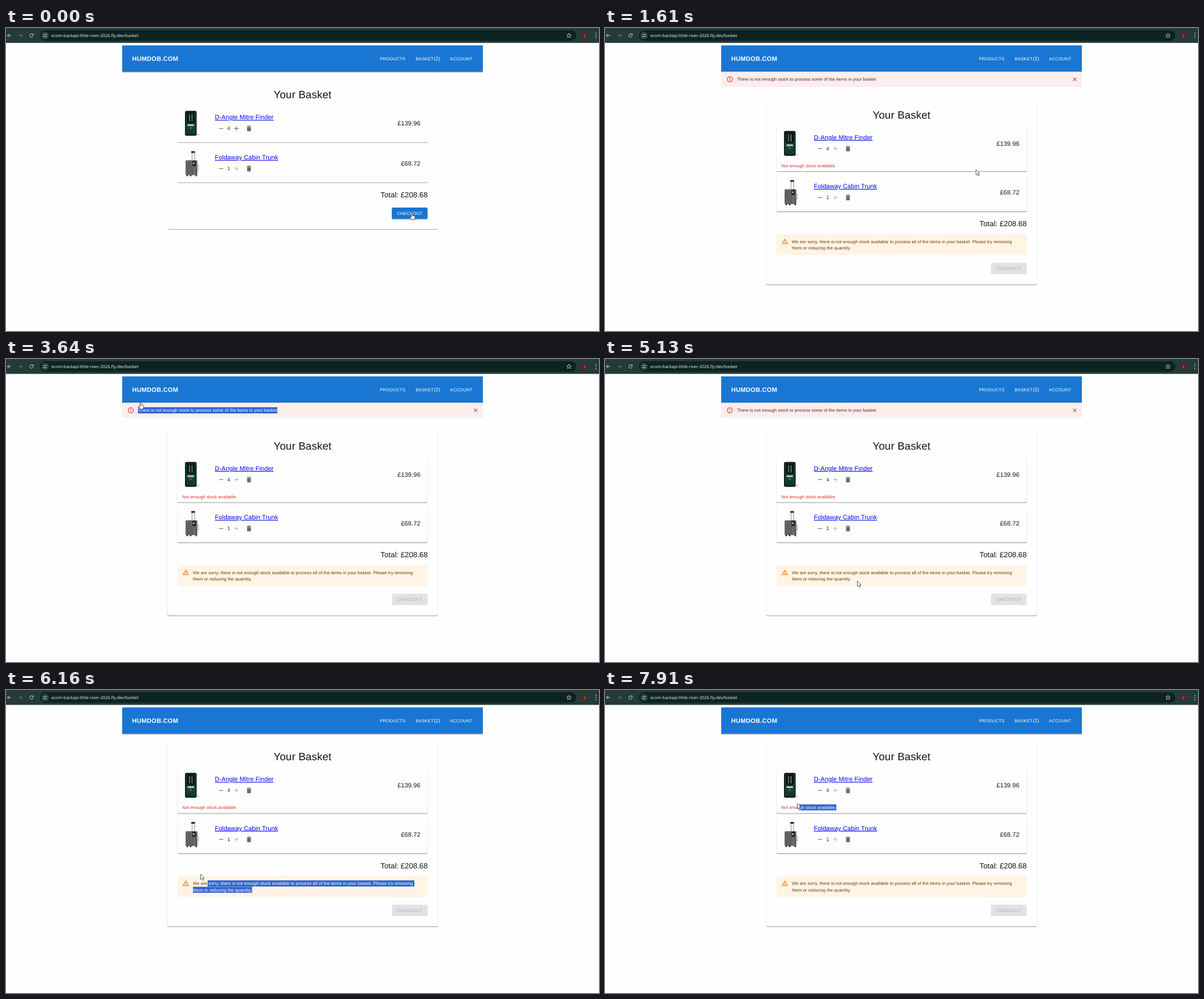
These frames come from a looping animation (1047x535 px, 8 s). An HTML page:

```html
<!DOCTYPE html>
<html lang="en">
<head>
<meta charset="utf-8">
<title>Your Basket</title>
<style>
html, body { margin: 0; width: 100%; height: 100%; overflow: hidden; background: #fefefe; }
svg { display: block; }
text { font-family: "Liberation Sans", Arial, sans-serif; white-space: pre; text-rendering: geometricPrecision; }
.bar text { font-family: "Open Sans", "Noto Sans", sans-serif; }
</style>
</head>
<body>
<svg id="stage" width="1047" height="535" viewBox="0 0 1047 535"></svg>
<script>
const LOOP = 8000, ZOOM = 0.5527, BLUE = '#1976d2', INK = '#151515', PAPER = '#fefefe';
const ALERT_IN = 420, BUTTON_GREY = 560, ALERT_OUT = 5260;

const ICON = {
  minus: 'M19 13H5v-2h14z',
  plus: 'M19 13h-6v6h-2v-6H5v-2h6V5h2v6h6z',
  bin: 'M6 19c0 1.1.9 2 2 2h8c1.1 0 2-.9 2-2V7H6zM19 4h-3.5l-1-1h-5l-1 1H5v2h14z',
  error: 'M11 15h2v2h-2zm0-8h2v6h-2zm.99-5C6.47 2 2 6.48 2 12s4.47 10 9.99 10C17.52 22 22 17.52 22 12S17.52 2 11.99 2M12 20c-4.42 0-8-3.58-8-8s3.58-8 8-8 8 3.58 8 8-3.58 8-8 8',
  warn: 'M12 5.99 19.53 19H4.47zM12 2 1 21h22zm1 14h-2v2h2zm0-6h-2v4h2z',
  close: 'M19 6.41 17.59 5 12 10.59 6.41 5 5 6.41 10.59 12 5 17.59 6.41 19 12 13.41 17.59 19 19 17.59 13.41 12z',
};

const CURSOR = {
  arrow: '<path d="M0 0V9.6L2.2 7.6 3.8 11 5.4 10.3 3.9 7H6.8Z" fill="#fff" stroke="#222" stroke-width=".7"/>',
  hand: '<path d="M-1 1Q-1 0 0 0T1 1V4.6Q5.8 4.8 5.8 7T4.4 12H-.5Q-2.4 9.5-3.7 7.8-3 6.2-1 7.8Z" fill="#fff" stroke="#222" stroke-width=".8"/>',
  beam: '<path d="M-1.5 0H1.5M0 0V10M-1.5 10H1.5" fill="none" stroke="#333" stroke-width=".8"/>',
};

// Pointer poses, each held until the next: time, x, y, shape, selected text, its left edge
const POSES = [
  [0, 716.5, 326.5, 'hand'], [420, 716, 326],
  [1480, 702, 306], [1610, 655, 250], [1740, 590, 180], [1870, 525, 118], [2000, 488, 90], [2130, 471, 78],
  [2260, 485, 87.5, 'beam'], [2970, 481, 87],
  [3110, 374, 80, 'arrow', 'alert', 374], [3250, 318, 66, 'arrow', 'alert', 318],
  [3380, 266, 52, 'hand', 'alert', 266], [3510, 240, 64, 'hand', 'alert', 233],
  [3640, 237.5, 76.5, 'hand', 'alert', 233],
  [3920, 238, 84], [4050, 240, 120], [4180, 247, 172], [4320, 274, 261], [4460, 304, 345],
  [4590, 335, 408], [4740, 388, 405], [4870, 421, 393], [5010, 441, 391], [5130, 445.5, 392],
  [5520, 440, 365], [5650, 436, 349, 'beam'],
  [5780, 412, 346, 'arrow', 'lower', 412], [5910, 385, 338, 'arrow', 'upper', 385],
  [6040, 362, 331, 'arrow', 'upper', 366], [6160, 343.5, 325, 'arrow', 'upper', 356],
  [6310, 343.5, 325, 'arrow', 'upper', 343],
  [6600, 365, 335], [6730, 405, 355], [6850, 435, 371, 'beam'], [7120, 432, 370],
  [7260, 428, 320], [7390, 418, 240], [7520, 410, 202, 'beam'],
  [7650, 404, 201, 'arrow', 'stock', 404], [7780, 372, 200, 'arrow', 'stock', 372],
  [7910, 339.5, 200, 'arrow', 'stock', 343],
];

const text = (x, y, words, px, fill = INK, spacing = .0107, more = '') =>
  `<text x="${x}" y="${y}" font-size="${px * ZOOM}" fill="${fill}" letter-spacing="${spacing}em" ${more}>${words}</text>`;
const rect = (x, y, w, h, fill, r = 0) =>
  `<rect x="${x}" y="${y}" width="${w}" height="${h}" fill="${fill}" rx="${r}"/>`;
const circle = (x, y, r, fill) => `<circle cx="${x}" cy="${y}" r="${r}" fill="${fill}"/>`;
const line = (d, stroke, width = 1) => `<path d="${d}" fill="none" stroke="${stroke}" stroke-width="${width}"/>`;
const move = (x, y, body) => `<g transform="translate(${x} ${y})">${body}</g>`;
const crop = (x, y, w, h, body) =>
  `<svg x="${x}" y="${y}" width="${w}" height="${h}" viewBox="${x} ${y} ${w} ${h}">${body}</svg>`;
// Icon on a 24 unit grid, centred on x, y
const icon = (name, x, y, px, fill) =>
  `<path d="${ICON[name]}" fill="${fill}" transform="translate(${x} ${y}) scale(${px * ZOOM / 24}) translate(-12 -12)"/>`;

// Soft bottom shadow, then the box itself
const raised = (x, y, w, h, fill, r = 0) =>
  rect(x, y + 4, w, h - 2, '#e3e3e6', r + .6) + rect(x, y + 3, w, h - 2, '#b4b8be', r + .4) + rect(x, y, w, h, fill, r);
// White sheet: dark lower edge and, when framed, faint sides
const card = (x, y, w, h, framed) =>
  (framed ? rect(x - .6, y + 1, w + 1.2, h + .9, '#e0e0e0', 2.6) : '') +
  rect(x, y + h - 5, w, 6.3, '#b6b6b6', 2.6) + rect(x, y, w, h, PAPER, 2.2);

// A line of body text, drawn selected between two edges if asked
function note(x, y, words, fill, from, to) {
  const plain = text(x, y, words, 14, fill);
  if (!from) return plain;
  const marked = rect(from, y - 8.3, to - from, 11.1, '#3367d1') + text(x, y, words, 14, '#fff');
  return plain + crop(from, y - 8.3, to - from, 11.1, marked);
}

const browserBar = () => `<g class="bar">` +
  rect(0, 0, 1047, 26.3, '#233b39') + rect(60, 4, 947, 18.5, '#0d2321', 9.2) +
  line('M9 13.2H2.5M5.5 10.2L2.5 13.2 5.5 16.2', '#d5dddb') +
  line('M22 13.2H28.5M25.5 10.2L28.5 13.2 25.5 16.2', '#6b7d7a') +
  line('M47.6 11.5A3 3 0 1 0 48 14M48.2 9.8V12H46', '#d5dddb') +
  circle(69, 13.3, 6.5, '#2d4542') +
  line('M66 11.6H69M66 15.2H67M69.5 15.2H72.3', '#dde4e2', .9) +
  circle(70.9, 11.6, 1, '#dde4e2') + circle(67.6, 15.2, 1, '#dde4e2') +
  text(80, 16, 'ecom-backapi-little-river-2026.fly.dev/basket', 13.55, '#f6f8f8', 0) +
  line('M994 9.3L995.2 12 998 12.2 995.8 14.1 996.5 16.9 994 15.4 991.5 16.9 992.2 14.1 990 12.2 992.8 12Z', '#dde4e2', .8) +
  circle(1021.5, 13.3, 5.6, '#5f2426') + text(1021.5, 15.6, 'I', 11, '#e6d5d5', 0, 'text-anchor="middle"') +
  [9.3, 13.3, 17.3].map(y => circle(1041.5, y, .9, '#dde4e2')).join('') + '</g>';

const header = () => raised(205.2, 30.7, 636.7, 46.6, BLUE) +
  text(222.8, 57.5, 'HUMDOB.COM', 20, '#fff', .025, 'font-weight="bold"') +
  text(660.2, 57, 'PRODUCTS', 14, '#fff', .0286) +
  text(723.2, 57, 'BASKET', 14, '#fff', .0286) + text(755.2, 57.2, '(2)', 16, '#fff', .025) +
  text(783.8, 57, 'ACCOUNT', 14, '#fff', .0286);

const gauge = () => rect(334, 186, 8, 4, '#ddd', 2) + rect(316, 146.3, 20.6, 44, '#141b19', 3.2) +
  rect(317.8, 149, 17, 38.5, '#0d4435', 2) + rect(319.6, 149.5, 13.4, 18, '#0c1211', 1) +
  line('M324 152V165M328.5 152V165', '#8b9995', 1.4) +
  rect(320.5, 170, 11.5, 3, '#b8ccc4', .5) + rect(319.5, 180, 13.5, 6.5, '#16352c', 1.5) +
  circle(326.3, 176.6, 1.5, '#d2502c');

const suitcase = () => line('M328.5 234V219M333.2 234V219', '#8a8a8a', 1) +
  rect(327, 217, 6.8, 3, '#222', 1) + rect(317, 233.2, 21, 26.2, '#6a6a6c', 2) +
  line('M320 235V258M323 235V258M326 235V258M329 245V258M335.5 245V258', '#454547', .8) +
  rect(329, 234, 6.2, 9.5, '#222', 1) + rect(330.3, 237, 2.2, 3, '#ddd') +
  line('M338 242H340V250H338', '#888', .8) +
  [320, 326, 336].map(x => circle(x, 260.2, 1.4, '#222')).join('');

const row = (name, count, price, full) =>
  text(368.8, 161.3, name, 20, '#0000ee', .0075, 'text-decoration="underline"') +
  icon('minus', 379.8, 177.4, 24, '#6a6a6a') + text(393.3, 180.4, count, 16, '#222', 0, 'text-anchor="middle"') +
  icon('plus', 406.8, 177.4, 24, full ? '#b4b4b4' : '#6a6a6a') + icon('bin', 429, 177.4, 24, '#6a6a6a') +
  text(731.7, 172.3, price, 20, INK, .0075, 'text-anchor="end"');

function checkout(t, y) {
  const active = t < ALERT_IN;
  const [fill, ink] = active ? [BLUE, '#fff'] : t < BUTTON_GREY ? ['#a5bcd8', '#8799b0'] : ['#e2e2e2', '#adadad'];
  const box = active ? raised : rect;
  const ripple = t < 130 || !active ? '' :
    crop(681.3, y, 63, 20.2, circle(716.5, y + 14, t < 270 ? 22 : 60, 'rgba(255,255,255,.18)'));
  return box(681.3, y, 63, 20.2, fill, 2.2) + ripple +
    text(713, y + 12.9, 'CHECKOUT', 14, ink, .0286, 'text-anchor="middle"');
}

function scene(t) {
  const [, x, y, shape = 'arrow', selected, left] = POSES.findLast(pose => pose[0] <= t);
  const from = name => name === selected ? left : 0;
  const failed = t >= ALERT_IN, alert = failed && t < ALERT_OUT;
  const errorGap = failed ? 15.6 : 0, warnGap = failed ? 46.4 : 0;

  const warning = rect(303, 328.2, 441.3, 37.4, '#fff4e5', 2.2) + icon('warn', 317.5, 341.3, 22, '#ed6c02') +
    note(330, 344.4, 'We are sorry, there is not enough stock available to process all of the items in your basket. Please try removing',
      '#663c00', from('upper'), 721) +
    note(330, 355.5, 'them or reducing the quantity.', '#663c00', selected === 'upper' ? 330 : from('lower'), 434.7);

  const basket = card(285, 90, 477, 265 + errorGap + warnGap, failed) +
    text(523.6, 124, 'Your Basket', 34, INK, .0074, 'text-anchor="middle"') +
    card(303, 137, 441.3, 64.7 + errorGap, failed) + gauge() + row('D-Angle Mitre Finder', 4, '£139.96', failed) +
    (failed ? note(311.2, 210, 'Not enough stock available.', '#d32f2f', from('stock'), 408.6) : '') +
    move(0, errorGap,
      card(303, 207.3, 441.3, 65.2, failed) + move(0, .4, suitcase()) +
      move(0, 70.8, row('Foldaway Cabin Trunk', 1, '£68.72', true)) +
      text(744.6, 299.2, 'Total: £208.68', 24, INK, 0, 'text-anchor="end"')) +
    (failed ? warning : '') + checkout(t, 316.9 + errorGap + warnGap);

  const banner = rect(205.2, 77.3, 636.7, 26.7, '#fdeded', 2.2) + icon('error', 220.4, 90.6, 22, '#d32f2f') +
    note(233, 93.4, 'There is not enough stock to process some of the items in your basket', '#5f2120', from('alert'), 479) +
    icon('close', 829.3, 90.7, 20, '#7d4a49');

  return browserBar() + header() + (alert ? banner : '') +
    move(0, alert ? 35.5 : 0, basket) + move(x, y, CURSOR[shape]);
}

const stage = document.getElementById('stage');
let shown = '';
function tick() {
  const next = scene(performance.now() % LOOP);
  if (next !== shown) stage.innerHTML = shown = next;
  requestAnimationFrame(tick);
}
tick();
</script>
</body>
</html>
```
